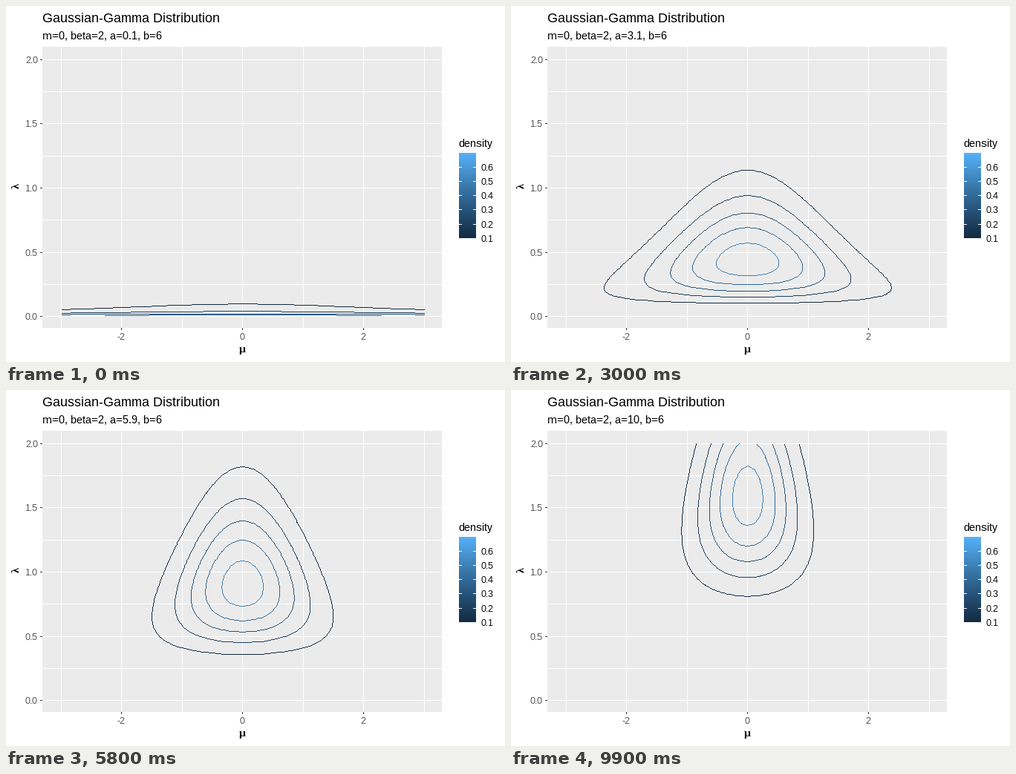
A matplotlib script for the animation above (10 s loop, 672x480 px).

```python
import math

import matplotlib.pyplot as plt
import numpy as np
from matplotlib.animation import FuncAnimation
from matplotlib.patches import Rectangle

W, H, DPI = 672, 480, 100
PX = 72 / DPI
FRAMES, INTERVAL = 100, 100
M, BETA, B = 0, 2, 6

LEFT, RIGHT, TOP, BOTTOM = 49.2, 587.2, 54.55, 433.91
MU = np.linspace(-3, 3, 61)
LAM = np.linspace(0.01, 2, 200)
LEVELS = np.arange(1, 8) / 10

RGB_XYZ = np.array([[0.4124564, 0.3575761, 0.1804375],
                    [0.2126729, 0.7151522, 0.0721750],
                    [0.0193339, 0.1191920, 0.9503041]])
WHITE = RGB_XYZ.sum(axis=1)


def to_lab(rgb):
    rgb = np.asarray(rgb) / 255
    lin = np.where(rgb > 0.04045, ((rgb + 0.055) / 1.055) ** 2.4, rgb / 12.92)
    t = RGB_XYZ @ lin / WHITE
    f = np.where(t > 0.008856, np.cbrt(t), 7.787 * t + 16 / 116)
    return np.array([116 * f[1] - 16, 500 * (f[0] - f[1]), 200 * (f[1] - f[2])])


def from_lab(lab):
    fy = (lab[..., 0] + 16) / 116
    f = np.stack([fy + lab[..., 1] / 500, fy, fy - lab[..., 2] / 200], axis=-1)
    xyz = np.where(f > 0.2069, f ** 3, (f - 16 / 116) / 7.787) * WHITE
    lin = np.clip(xyz @ np.linalg.inv(RGB_XYZ).T, 0, 1)
    return np.where(lin > 0.0031308, 1.055 * lin ** (1 / 2.4) - 0.055, 12.92 * lin)


LOW, HIGH = to_lab([0x13, 0x2B, 0x43]), to_lab([0x56, 0xB1, 0xF7])


def shade(t):
    """Dark to light blue, blended in Lab space."""
    t = np.asarray(t)[..., None]
    return from_lab(LOW + t * (HIGH - LOW))


def px_x(mu):
    return (LEFT + RIGHT) / 2 + mu * (RIGHT - LEFT) / 6.6


def px_y(lam):
    pad = 0.05 * 1.99
    return BOTTOM - (lam - 0.01 + pad) * (BOTTOM - TOP) / (1.99 + 2 * pad)


def density(a):
    mu, lam = np.meshgrid(MU, LAM)
    normal = np.sqrt(BETA * lam / (2 * np.pi)) * np.exp(-BETA * lam * (mu - M) ** 2 / 2)
    gamma = B ** a / math.gamma(a) * lam ** (a - 1) * np.exp(-B * lam)
    return normal * gamma


def snap(v):
    return np.floor(np.asarray(v) + 0.5).astype(int)


def trace(img, points, color):
    """Draw a polyline one pixel wide, without smoothing."""
    p = snap(points)
    d = np.diff(p, axis=0)
    steps = np.abs(d).max(axis=1)
    seg = np.repeat(np.arange(len(d)), steps)
    k = np.arange(len(seg)) - np.repeat(np.cumsum(steps) - steps, steps)
    x, y = snap(p[seg] + d[seg] * (k / steps[seg])[:, None]).T
    img[y, x, :3] = color
    img[y, x, 3] = 1


# Whole-pixel glyph advances, as in screen text
plt.rcParams.update({"font.family": "Liberation Sans", "text.hinting": "native",
                     "text.hinting_factor": 1, "text.kerning_factor": 6})
fig = plt.figure(figsize=(W / DPI, H / DPI), dpi=DPI, facecolor="white")
ax = fig.add_axes([0, 0, 1, 1])
ax.axis("off")


def rect(x, y, w, h, color):
    ax.add_patch(Rectangle((x, y), w, h, fc=color, ec="none", lw=0,
                           antialiased=False, zorder=1))


def text(x, y, s, size, color="black", **kw):
    return ax.text(x, y, s, fontsize=size * PX, color=color, va="baseline", **kw)


def symbol(x, y, s, **kw):
    text(x, y, s, 15, ha="center", family="Liberation Serif", weight="bold", **kw)


x0, x1, y0, y1 = snap([LEFT, RIGHT, TOP, BOTTOM])
rect(x0, y0, x1 - x0, y1 - y0, "#EBEBEB")
for mu in range(-3, 4):
    rect(snap(px_x(mu)), y0, 1, y1 - y0, "white")
for k in range(9):
    rect(x0, snap(px_y(k / 4)), x1 - x0, 1, "white")

for mu in (-2, 0, 2):
    x = snap(px_x(mu))
    rect(x, y1, 1, 3, "#333333")
    text(x, 450, str(mu), 12, "#4D4D4D", ha="center")
for k in range(5):
    y = snap(px_y(k / 2))
    rect(x0 - 3, y, 3, 1, "#333333")
    text(43, y + 5, f"{k / 2:.1f}", 12, "#4D4D4D", ha="right")

text(49, 22, "Gaussian-Gamma Distribution", 18)
subtitle = text(49, 45, "", 15)
symbol(318, 467, "μ")
symbol(18, 243, "λ", rotation=90, rotation_mode="anchor")

# Colour bar
text(609, 190, "density", 15)
ax.imshow(shade(np.linspace(1, 0, 115))[:, None, :], extent=(610, 633, 313, 198),
          aspect="auto", interpolation="nearest", zorder=1)
for k in range(1, 7):
    y = snap(312.8 - (k - 1) * 19.2)
    if k > 1:
        rect(610, y, 4, 1, "white")
        rect(629, y, 4, 1, "white")
    text(640, y + 5, f"{k / 10:.1f}", 12)

layer = ax.imshow(np.zeros((H, W, 4)), extent=(0, W, H, 0), aspect="auto",
                  interpolation="nearest", zorder=3)
ax.set_xlim(0, W)
ax.set_ylim(H, 0)

GRID_X, GRID_Y = px_x(MU), px_y(LAM)
COLORS = shade((LEVELS - 0.1) / 0.6)


def update(i):
    a = round(0.1 * (i + 1), 1)
    subtitle.set_text(f"m={M}, beta={BETA}, a={a:g}, b={B}")
    lines = ax.contour(GRID_X, GRID_Y, density(a), levels=LEVELS)
    img = np.zeros((H, W, 4))
    for paths, color in zip(lines.allsegs, COLORS):
        for points in paths:
            if len(points) > 1:
                trace(img, points, color)
    lines.remove()
    layer.set_data(img)
    return []


anim = FuncAnimation(fig, update, frames=FRAMES, interval=INTERVAL,
                     init_func=lambda: [], repeat=True, repeat_delay=0)
plt.show()
```
